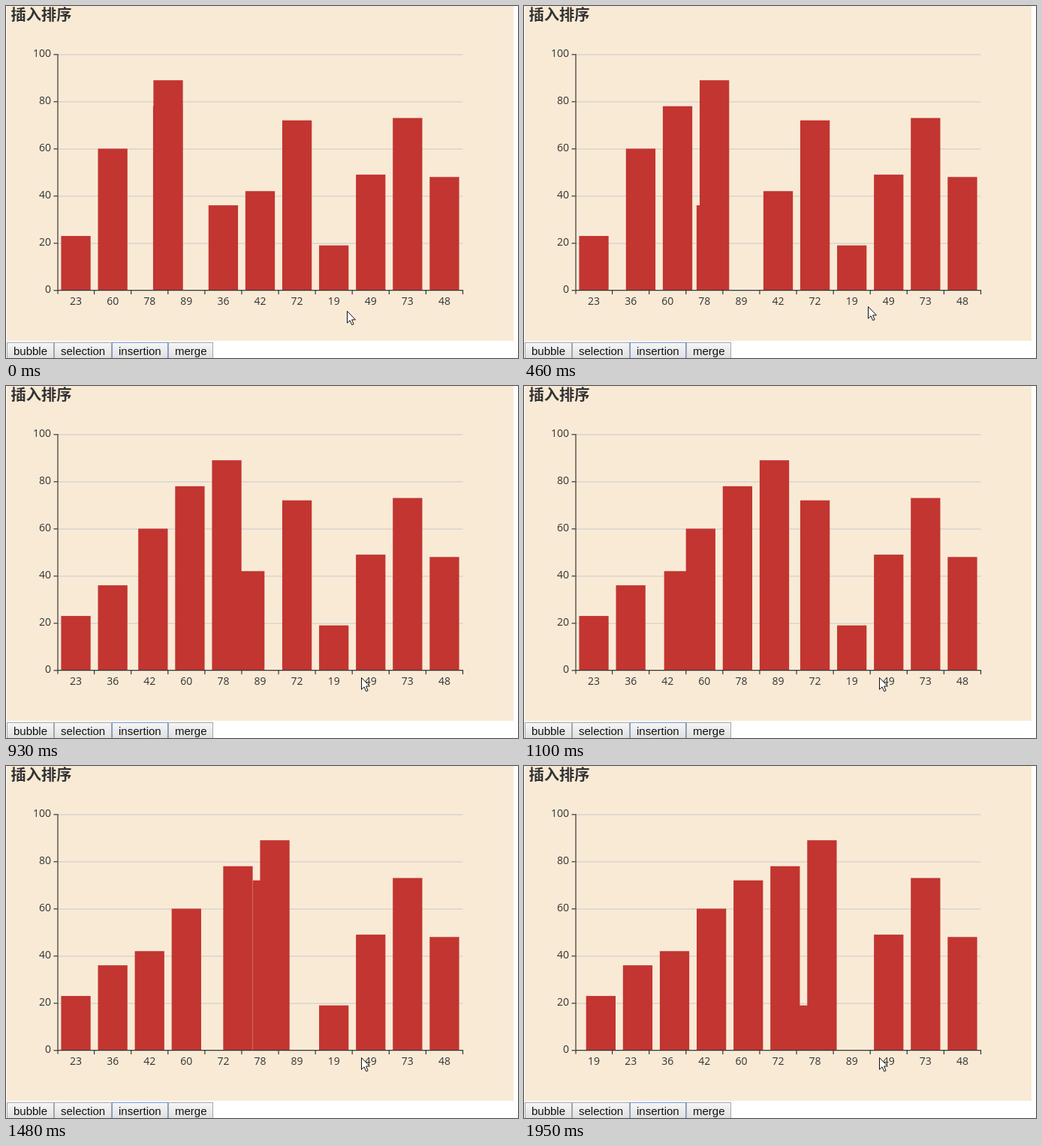
Animation, 682 px wide and 470 px high, one loop 2040 ms. Source, as an HTML page:

```html
<!DOCTYPE html>
<html lang="zh">
<head>
<meta charset="utf-8">
<title>插入排序</title>
<style>
  html, body { margin: 0; width: 100%; height: 100%; overflow: hidden; background: #fff; }
  svg { display: block; }
  .label { font: 14px "Open Sans", "Noto Sans", sans-serif; fill: #333; }
  .title { font: bold 20.25px "Noto Sans CJK SC", "Noto Sans CJK", sans-serif; fill: #333; }
  .button { font: 15px "Liberation Sans", Arial, sans-serif; fill: #111; }
</style>
</head>
<body>
<svg id="stage" width="682" height="470" viewBox="0 0 682 470">
  <defs>
    <linearGradient id="face" x1="0" y1="0" x2="0" y2="1">
      <stop offset="0" stop-color="#f6f6f6"/>
      <stop offset="1" stop-color="#dcdcdc"/>
    </linearGradient>
  </defs>
</svg>
<script>
const LOOP = 2040;
const MOVE = 340;
const LEFT = 68.5, BASE = 379.5, WIDTH = 540, UNIT = 3.15;
const START = [23, 60, 89, 78, 36, 42, 72, 19, 49, 73, 48];
const BAND = WIDTH / START.length;
const FIRST_INSERT = 3;
const INSERT_AT = [-71, 426, 919, 1427, 1927];

// The picture is refreshed at these moments and held in between.
const TICKS = [0, 70, 150, 230, 300, 380, 460, 550, 620, 700, 780, 850, 930,
  1020, 1100, 1170, 1250, 1330, 1400, 1480, 1570, 1650, 1720, 1800, 1870, 1950];

// Pointer path: time, x, y
const POINTER = [[0, 454, 407], [150, 454, 406], [300, 454, 406], [550, 460, 398],
  [620, 465, 394], [700, 470, 391], [780, 473, 389]];

const stage = document.getElementById("stage");

function add(tag, attrs, text) {
  const el = document.createElementNS("http://www.w3.org/2000/svg", tag);
  for (const name in attrs) el.setAttribute(name, attrs[name]);
  if (text !== undefined) el.textContent = text;
  return stage.appendChild(el);
}

function line(x1, y1, x2, y2, stroke, width) {
  add("line", { x1, y1, x2, y2, stroke, "stroke-width": width });
}

// Moves the item at index i to its place among the sorted items before it.
function insert(list, i) {
  const head = list.slice(0, i);
  const at = head.filter(v => v < list[i]).length;
  return [...head.slice(0, at), list[i], ...head.slice(at), ...list.slice(i + 1)];
}

const orders = [START];
INSERT_AT.forEach((_, k) => orders.push(insert(orders[k], FIRST_INSERT + k)));

add("rect", { x: 1, y: 0, width: 675, height: 447, fill: "#f9ead6" });
add("text", { x: 6.5, y: 18.5, class: "title" }, "插入排序");

for (let v = 0; v <= 100; v += 20) {
  const y = BASE - v * UNIT;
  if (v) line(LEFT, y + 0.5, LEFT + WIDTH, y + 0.5, "#d8d4cc", 1.5);
  line(LEFT - 5, y + 0.3, LEFT, y + 0.3, "#333", 1.2);
  add("text", { x: 60, y: y + 3.7, class: "label", "text-anchor": "end" }, v);
}

const bars = START.map(v => ({
  value: v,
  el: add("rect", {
    y: BASE - v * UNIT, width: BAND * 0.8, height: v * UNIT, fill: "#c23531"
  })
}));

line(LEFT + 0.5, 64, LEFT + 0.5, BASE + 5, "#333", 1.2);
line(LEFT, BASE + 0.2, LEFT + WIDTH + 0.5, BASE + 0.2, "#333", 1.2);
for (let i = 1; i <= START.length; i++) {
  const x = LEFT + i * BAND;
  line(x, BASE, x, BASE + 5.5, "#333", 1.2);
}

const labels = START.map((_, i) => add("text", {
  x: LEFT + (i + 0.5) * BAND, y: 399, class: "label", "text-anchor": "middle"
}));

function button(x, width, text, border) {
  add("rect", {
    x: x + 0.5, y: 449.5, width: width - 1, height: 24,
    fill: "url(#face)", stroke: border || "#a6a6a6"
  });
  add("text", { x: x + 9, y: 466, class: "button" }, text);
}
button(1, 63, "bubble");
button(64, 77, "selection");
button(216, 60, "merge");
button(141, 75, "insertion", "#6f98d8");

const pointer = add("path", {
  d: "M.5 .5V16.2L4.1 12.8L6.7 18.7L9.1 17.7L6.6 11.9H11.5Z",
  fill: "#fff", stroke: "#111", "stroke-width": 1, "stroke-linejoin": "round"
});

const mix = (a, b, p) => a + (b - a) * p;
const clamp = p => Math.min(1, Math.max(0, p));
const cubicOut = p => 1 - (1 - p) ** 3;

function pointerAt(t) {
  const next = POINTER.findIndex(p => p[0] > t);
  if (next < 0) return POINTER[POINTER.length - 1].slice(1);
  const a = POINTER[next - 1], b = POINTER[next];
  const p = (t - a[0]) / (b[0] - a[0]);
  return [1, 2].map(i => Math.round(mix(a[i], b[i], p)));
}

function render(time) {
  const t = TICKS.filter(s => s <= time).pop();
  const step = INSERT_AT.filter(s => s <= t).length - 1;
  const before = orders[step], after = orders[step + 1];
  const p = cubicOut(clamp((t - INSERT_AT[step]) / MOVE));

  for (const { value, el } of bars) {
    const slot = mix(before.indexOf(value), after.indexOf(value), p);
    el.setAttribute("x", LEFT + (slot + 0.1) * BAND);
  }
  labels.forEach((el, i) => { el.textContent = after[i]; });
  pointer.setAttribute("transform", `translate(${pointerAt(t)})`);
}

const begin = performance.now();
function loop() {
  render((performance.now() - begin) % LOOP);
  requestAnimationFrame(loop);
}
loop();
</script>
</body>
</html>
```
